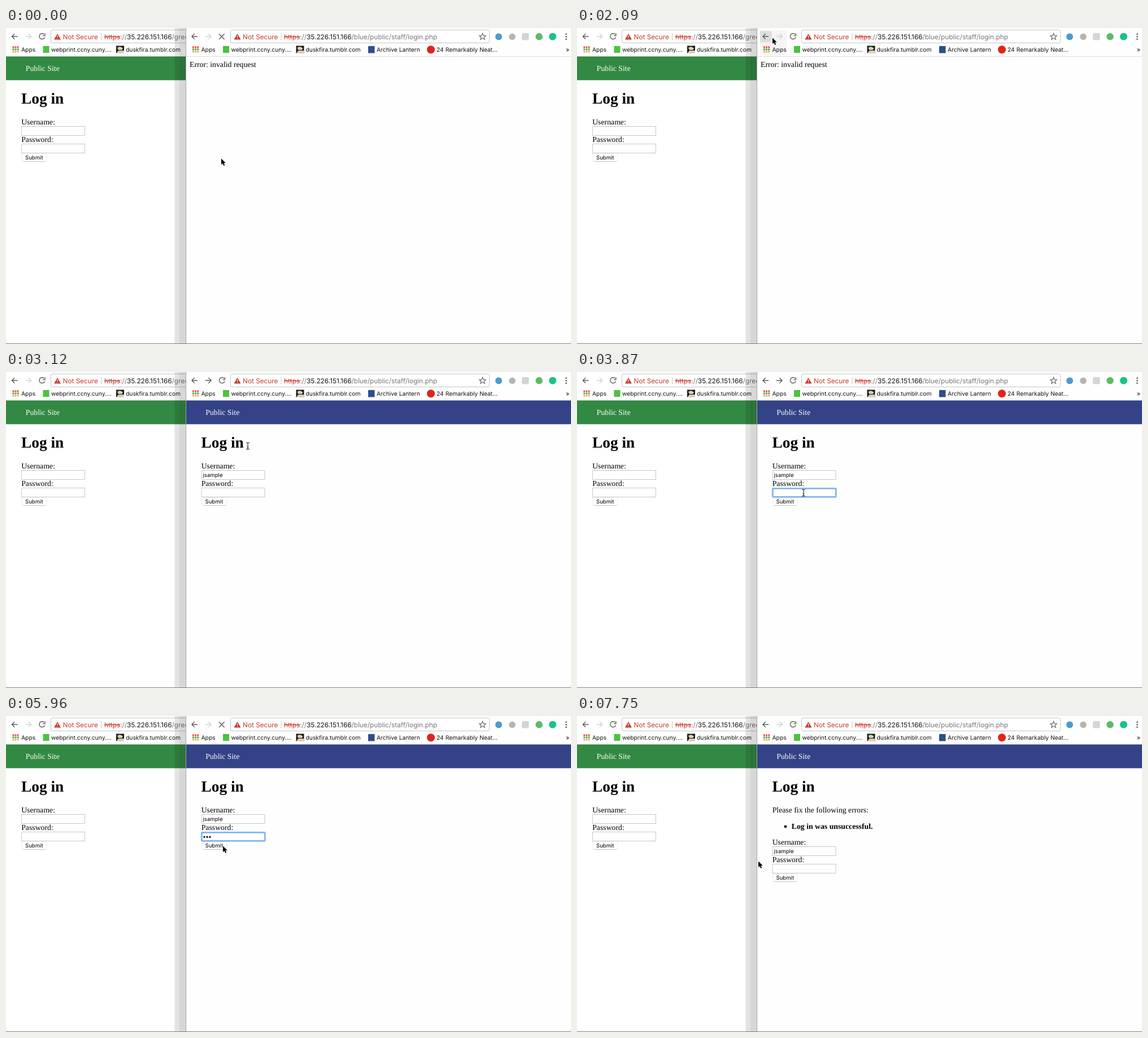
Animation, 1000 px wide and 560 px high, one loop 8000 ms. Source, as an HTML page:

```html
<!DOCTYPE html>
<html lang="en">
<head>
<meta charset="utf-8">
<title>Log in</title>
<style>
html, body { margin: 0; width: 100%; height: 100%; overflow: hidden; background: #fff; }
svg { display: block; width: 1000px; height: 560px; }
text { white-space: pre; text-rendering: geometricPrecision; }
.url { font: 11.8px Inter, sans-serif; fill: #777; }
.url .bad, .warn { fill: #c9382c; }
.url .bad { text-decoration: line-through; }
.url .host { fill: #111; }
.mark { font: 10.3px Inter, sans-serif; fill: #111; }
.field { font: 9.6px Inter, sans-serif; fill: #000; }
.page { font: 13.75px "Liberation Serif", serif; fill: #000; }
.page .h1 { font-size: 27.4px; font-weight: bold; }
.page .nav { fill: #fff; }
.icon { fill: none; stroke: #5c5c5c; stroke-width: 1.4; }
.box { fill: #fff; stroke: #c6c6c6; }

.anim, #cursor, #arrow, #beam { animation: 8s step-end infinite; }
#stop { animation-name: stop; }
#reload { animation-name: reload; }
#next { animation-name: next; }
#hover { animation-name: hover; }
#glow { animation-name: glow; }
#wash { animation-name: wash; }
#error { animation-name: error; }
#login { animation-name: login; }
#failed { animation-name: failed; }
#focus { animation-name: focus; }
#dot1 { animation-name: dot1; }
#dot2 { animation-name: dot2; }
#dot3 { animation-name: dot3; }
#cursor { animation-name: move; }
#arrow { animation-name: arrow; }
#beam { animation-name: beam; }

@keyframes stop { 0%, 67% { opacity: 1 } 1.875%, 78.125%, 100% { opacity: 0 } }
@keyframes reload { 0%, 67% { opacity: 0 } 1.875%, 78.125%, 100% { opacity: 1 } }
@keyframes next { 0%, 74.5%, 100% { stroke: #d2d2d2 } 35.375% { stroke: #5c5c5c } }
@keyframes hover { 0%, 39%, 100% { opacity: 0 } 16.75% { opacity: 1 } }
@keyframes glow { 0%, 33.5%, 100% { opacity: 0 } 14.875% { opacity: 1 } }
@keyframes wash { 0%, 39%, 100% { opacity: 0 } 37.125% { opacity: 1 } }
@keyframes error { 0% { opacity: 1 } 39%, 100% { opacity: 0 } }
@keyframes login { 0%, 78.125%, 100% { opacity: 0 } 39% { opacity: 1 } }
@keyframes failed { 0% { opacity: 0 } 78.125%, 100% { opacity: 1 } }
@keyframes focus { 0% { opacity: 0 } 48.375%, 100% { opacity: 1 } }
@keyframes dot1 { 0% { opacity: 0 } 55.75%, 100% { opacity: 1 } }
@keyframes dot2 { 0% { opacity: 0 } 57.625%, 100% { opacity: 1 } }
@keyframes dot3 { 0% { opacity: 0 } 59.5%, 100% { opacity: 1 } }
@keyframes arrow {
  0%, 63.25%, 87.5%, 100% { opacity: 1 }
  39%, 85.625% { opacity: 0 }
}
@keyframes beam {
  0%, 55.75%, 63.25%, 87.5%, 100% { opacity: 0 }
  39%, 61.375%, 85.625% { opacity: 1 }
}
@keyframes move {
  0% { transform: translate(381px, 231px) }
  9.375% { transform: translate(377px, 215px) }
  11.25% { transform: translate(367px, 162px) }
  13.125% { transform: translate(356px, 88px) }
  14.875% { transform: translate(348px, 38px) }
  16.75% { transform: translate(344px, 18px) }
  26.125% { transform: translate(346px, 17px) }
  28% { transform: translate(345px, 19px) }
  33.5% { transform: translate(352px, 30px) }
  35.375% { transform: translate(375px, 58px) }
  37.125% { transform: translate(408px, 90px) }
  39% { transform: translate(428px, 131px) }
  40.875% { transform: translate(425px, 165px) }
  42.75% { transform: translate(415px, 195px) }
  44.625% { transform: translate(405px, 211px) }
  46.5% { transform: translate(401px, 214px) }
  61.375% { transform: translate(402px, 217px) }
  63.25% { transform: translate(398px, 229px) }
  65.125% { transform: translate(393px, 233px) }
  67% { transform: translate(384px, 230px) }
  85.625% { transform: translate(410px, 234px) }
  87.5% { transform: translate(560px, 330px) }
  89.375% { transform: translate(770px, 435px) }
  91.25% { transform: translate(870px, 465px) }
  93.125% { transform: translate(720px, 400px) }
  95% { transform: translate(470px, 312px) }
  96.875%, 100% { transform: translate(321px, 257px) }
}
</style>
</head>
<body>
<svg viewBox="0 0 1000 560">
<defs>
  <path id="fwd" d="M34.5 15H44.5M39.8 10.2L44.6 15L39.8 19.8"/>
  <path id="turn" d="M67.6 11.4A5 5 0 1 0 68.6 16.4M68.9 9.6V13.6H64.9"/>

  <!-- toolbar parts that both windows share -->
  <g id="bar">
    <path class="icon" d="M20.5 15H10.5M15.2 10.2L10.4 15L15.2 19.8"/>
    <path fill="#c9382c" d="M91 10L97 20.5H85Z"/>
    <path stroke="#fff" stroke-width="1.2" d="M91 13.3V16.8M91 17.8V19"/>
    <text class="url" x="100.5" y="19.5"><tspan class="warn">Not Secure</tspan></text>
    <path stroke="#c8c8c8" d="M168.5 9V22"/>
    <g stroke-width="2.8" stroke-dasharray="2.8 1.3">
      <path stroke="#d94a3d" d="M11.5 34H22.5"/>
      <path stroke="#4c9a52" d="M11.5 38H22.5"/>
      <path stroke="#e5b13a" d="M11.5 42H22.5"/>
    </g>
    <text class="mark" x="27" y="41.8">Apps</text>
    <rect x="65.5" y="32" width="11" height="12" fill="#4fc043"/>
    <text class="mark" x="80" y="41.8">webprint.ccny.cuny....</text>
    <rect x="195" y="31.5" width="14" height="13.5" fill="#1d1a17"/>
    <path fill="#d9d0bd" d="M197 35Q202 31 207 36L205 39H199ZM195 45L199 40H209V45Z"/>
    <text class="mark" x="212" y="41.8">duskfira.tumblr.com</text>
  </g>

  <g id="form">
    <g class="page">
      <text x="27.2" y="171">Username:</text>
      <text x="27.2" y="202">Password:</text>
    </g>
    <rect class="box" x="27.5" y="174.5" width="112" height="16"/>
    <rect class="box" x="27.5" y="205.5" width="112" height="16"/>
    <rect x="28" y="223" width="44" height="13.5" rx="2.5" fill="#fff" stroke="#ececec"/>
    <path stroke="#c4c4c4" d="M30 236.5H70"/>
    <text class="field" x="34" y="233">Submit</text>
  </g>

  <g id="heading" class="page">
    <text class="nav" x="34.8" y="76">Public Site</text>
    <text class="h1" x="27" y="133.8">Log in</text>
  </g>
</defs>

<rect width="1000" height="560" fill="#fff"/>

<!-- left window -->
<path stroke="#dcdcdc" d="M0 50.5H318"/>
<rect class="box" x="79.5" y="3.5" width="260" height="23" rx="2.5"/>
<use href="#bar"/>
<use href="#fwd" class="icon" style="stroke:#d2d2d2"/>
<use href="#turn" class="icon"/>
<text class="url" x="174" y="19.5"><tspan class="bad">https</tspan>://<tspan class="host">35.226.151.166</tspan>/green</text>
<rect y="50.5" width="318" height="42" fill="#328943"/>
<use href="#heading"/>
<use href="#form"/>
<rect x="298.5" width="20" height="560" opacity=".11"/>
<rect x="306.5" width="12" height="560" opacity=".05"/>

<!-- right window -->
<rect x="318.5" width="682" height="560" fill="#fefefe"/>
<g id="glow" class="anim"><rect x="324" y="5" width="47.5" height="43.5" fill="#f5f5f5"/></g>
<g id="hover" class="anim"><rect x="324" y="5" width="20.5" height="20.5" rx="2" fill="#dedede"/></g>
<g id="wash" class="anim" fill="#fafafa">
  <rect x="319" y="50" width="606" height="57"/>
  <rect x="925" y="8" width="25" height="34"/>
</g>
<path stroke="#dcdcdc" d="M318 50.5H1000"/>
<rect class="box" x="397.5" y="3.5" width="458" height="23" rx="2.5"/>
<use href="#bar" x="318.5"/>
<g id="next" class="icon anim" style="stroke:#d2d2d2"><use href="#fwd" x="318.5"/></g>
<g id="reload" class="icon anim"><use href="#turn" x="318.5"/></g>
<path id="stop" class="icon anim" d="M377 10.3L386.6 19.9M386.6 10.3L377 19.9"/>
<text class="url" x="492" y="19.5"><tspan class="bad">https</tspan>://<tspan class="host">35.226.151.166</tspan>/blue/public/staff/login.php</text>
<path class="icon" style="stroke-width:1.1" d="M843.5 9.5L845.1 13.3L849.2 13.6L846.1 16.3L847.1 20.3L843.5 18.1L839.9 20.3L840.9 16.3L837.8 13.6L841.9 13.3Z"/>
<circle cx="872" cy="15.5" r="6" fill="#4b9bd0"/>
<circle cx="896" cy="15.5" r="5.8" fill="#b4b4b4"/>
<rect x="913" y="9" width="12.5" height="12.5" rx="2" fill="#d5d5d5"/>
<circle cx="943.5" cy="15.3" r="6.2" fill="#5abb62"/>
<circle cx="967.5" cy="15.2" r="6.5" fill="#1cc286"/>
<g fill="#5c5c5c">
  <circle cx="991.5" cy="10.8" r="1.4"/><circle cx="991.5" cy="15.3" r="1.4"/><circle cx="991.5" cy="19.8" r="1.4"/>
</g>
<rect x="641" y="32" width="11.5" height="12.5" fill="#2c4f8c"/>
<text class="mark" x="656" y="41.8">Archive Lantern</text>
<circle cx="752" cy="38.2" r="7" fill="#e2231a"/>
<text class="mark" x="762" y="41.8">24 Remarkably Neat...</text>
<text class="mark" x="991" y="41.5">»</text>

<g id="error" class="anim page"><text x="325" y="68.8">Error: invalid request</text></g>

<g id="login" class="anim">
  <rect x="318.5" y="50.5" width="682" height="42" fill="#344287"/>
  <use href="#heading" x="318.5"/>
  <use href="#form" x="318.5"/>
  <text class="field" x="348.5" y="186">jsample</text>
  <g id="focus" class="anim">
    <rect x="346.3" y="206.3" width="112" height="15" rx="1.5" fill="#fff" stroke="#7fb6f2" stroke-width="2.8"/>
    <circle id="dot1" class="anim" cx="351" cy="214.3" r="1.6"/>
    <circle id="dot2" class="anim" cx="356" cy="214.3" r="1.6"/>
    <circle id="dot3" class="anim" cx="361" cy="214.3" r="1.6"/>
  </g>
</g>

<g id="failed" class="anim">
  <rect x="318.5" y="50.5" width="682" height="42" fill="#344287"/>
  <use href="#heading" x="318.5"/>
  <g class="page">
    <text x="345.7" y="171">Please fix the following errors:</text>
    <circle cx="369" cy="196" r="2.4"/>
    <text x="379.8" y="199.6" font-weight="bold">Log in was unsuccessful.</text>
  </g>
  <use href="#form" x="318.5" y="57"/>
  <text class="field" x="348.5" y="243">jsample</text>
</g>

<path stroke="#a6a6a6" d="M318.5 0V560"/>
<path stroke="#7d7d7d" d="M0 559.5H1000"/>

<g id="cursor">
  <path id="arrow" d="M0 .5V11.2L2.5 8.9L4.4 13.1L6.2 12.3L4.4 8.2H7.8Z" stroke="#fff" stroke-width="1.4" paint-order="stroke"/>
  <path id="beam" fill="none" stroke="#222" stroke-width="1.1" d="M-3 -6Q-.5 -6 0 -4.8Q.5 -6 3 -6M0 -4.8V4.8M-3 6Q-.5 6 0 4.8Q.5 6 3 6M-1.5 2H1.5"/>
</g>
</svg>
</body>
</html>
```
